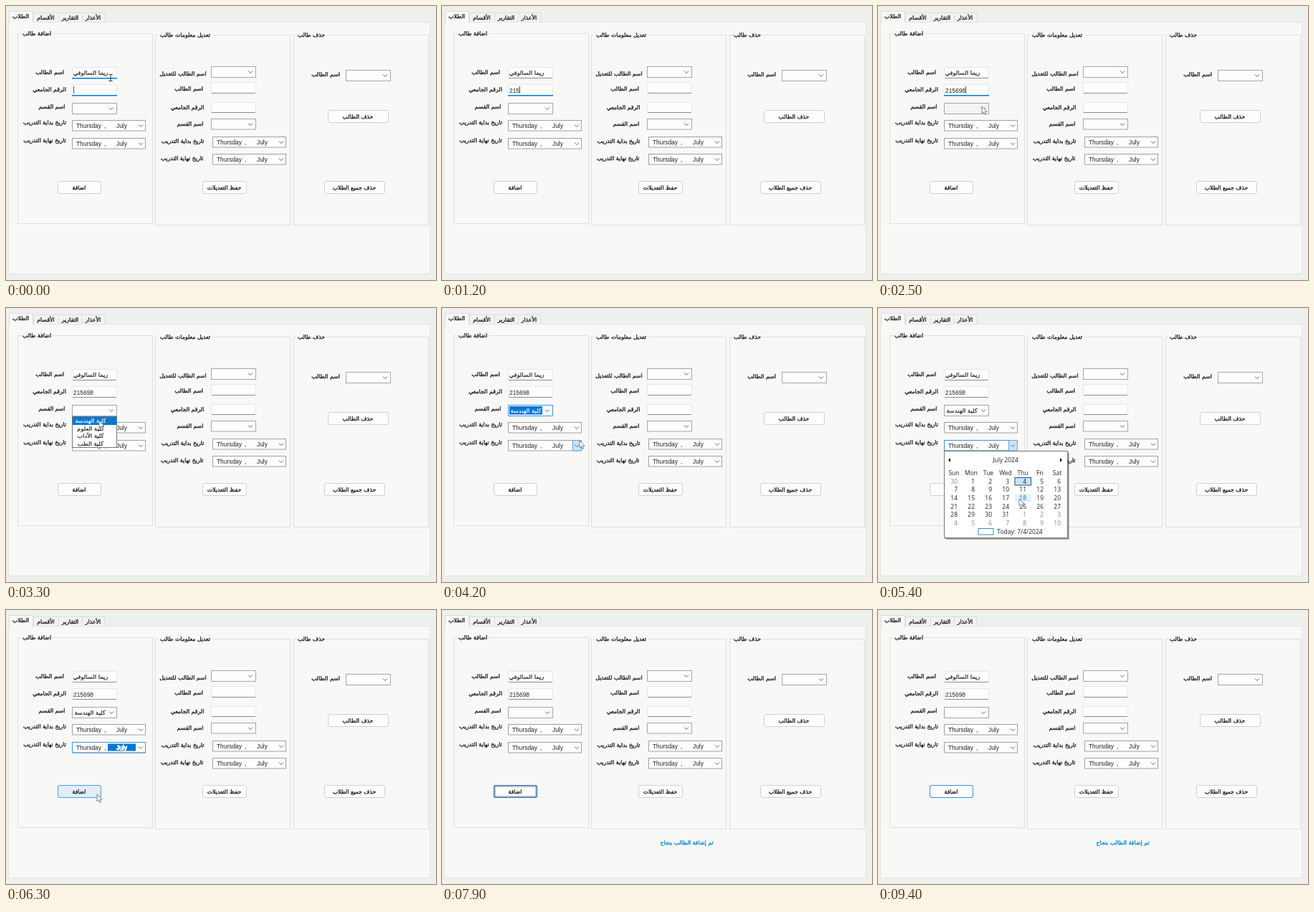
Write an HTML page that moves like this. It is 600 by 382 pixels and loops after 9.5 s.

```html
<!DOCTYPE html>
<html lang="ar">
<head>
<meta charset="utf-8">
<title>إضافة طالب</title>
<style>
html, body { margin: 0; width: 100%; height: 100%; overflow: hidden; background: #eef0ee; }
svg { display: block; width: 600px; height: 382px; }
text { font: 8.4px "Liberation Sans", sans-serif; fill: #222; }
.ar { font: 7.8px "DejaVu Sans", sans-serif; text-anchor: middle; stroke: #222; stroke-width: .35; }
.val { font-size: 8.3px; stroke-width: .2; }
.cal text { font: 8.5px "Open Sans", sans-serif; text-anchor: middle; }
.cal .day { text-anchor: end; }
.cal .out { fill: #858585; }
.note { fill: #0a84d8; stroke: #0a84d8; }
.light, #row + text { fill: #fff; stroke: #fff; }
.chev { fill: none; stroke: #666; }
.group { fill: none; stroke: #dedfde; }
</style>
</head>
<body>
<svg id="stage" viewBox="0 0 600 382"></svg>
<script>
const BLUE = '#0078d4', PAGE = '#f8f9f7';
const LOOP = 9500, STEP = 100;

const rect = (x, y, w, h, fill, stroke = 'none', more = '') =>
  `<rect x="${x}" y="${y}" width="${w}" height="${h}" fill="${fill}" stroke="${stroke}" ${more}/>`;
const text = (s, x, y, cls = '', more = '') => `<text x="${x}" y="${y}" class="${cls}" ${more}>${s}</text>`;
const arabic = (s, x, y, cls = '', more = '') => text(s, x, y + 2.5, 'ar ' + cls, more);
const part = (id, body) => `<g id="${id}">${body}</g>`;

const chevron = (x, y) => `<path class="chev" d="M${x - 3} ${y - 1.5}l3 3 3-3"/>`;

const group = (title, x, y, w, h, cx, tw) =>
  rect(x + .5, y + .5, w, h, 'none', '', 'class="group"') +
  rect(cx - tw / 2, y - 3, tw, 7, PAGE) + arabic(title, cx, y);

const field = (x, y, w = 62, h = 15) =>
  rect(x + .5, y + .5, w, h, '#fdfdfd', '#e6e6e6', 'rx="1.5"') +
  rect(x + 1, y + h, w - 1, 1, '#8c8c8c');

const combo = (x, y, h = 15) =>
  rect(x + .5, y + .5, 62, h, '#fdfdfd', '#a6a6a6') + chevron(x + 55, y + 8);

const date = (x, y) =>
  rect(x + .5, y + .5, 102, 14.5, '#fdfdfd', '#a0a0a0') +
  text('Thursday', x + 6, y + 10.5) + text(',', x + 45, y + 10.5) +
  text('July', x + 62, y + 10.5) + chevron(x + 96, y + 8);

const button = (s, x, y, w) =>
  rect(x + .5, y + .5, w, 17, '#fdfdfd', '#cfcfcf', 'rx="2.5"') + arabic(s, x + w / 2, y + 9);

function tabs() {
  const tab = (s, x, w) => rect(x + .5, 9.5, w, 13, '#f1f2f1', '#dcdddc') + arabic(s, x + w / 2, 16);
  return tab('الأقسام', 38, 35) + tab('التقارير', 73, 33) + tab('الأعذار', 106, 31) +
    rect(3.5, 22.5, 588, 351, PAGE, '#e2e3e2') +
    rect(4.5, 7.5, 33, 16, PAGE, '#dcdddc') + rect(5, 21, 32, 4, PAGE) + arabic('الطلاب', 20.5, 14.5);
}

function calendar() {
  let out = rect(95, 202, 172, 121, '#000', 'none', 'opacity=".22"') +
    rect(94, 201, 172, 121, '#000', 'none', 'opacity=".25"') +
    rect(92.5, 199.5, 172, 121, '#fff', '#777') +
    '<path d="M101 209l-3 3 3 3zM254 209l3 3-3 3z" fill="#111"/>' +
    text('July 2024', 178, 215) +
    rect(191, 259, 23, 11.5, '#e5f1fb', 'none', 'id="hover"') +
    rect(191, 236.5, 22.5, 10.5, '#cbe3f6', '#17568c');
  'Sun Mon Tue Wed Thu Fri Sat'.split(' ').forEach((d, i) => out += text(d, 106 + 24 * i, 233));
  for (let i = 0; i < 42; i++) {
    const n = i < 1 ? 30 : (i - 1) % 31 + 1;
    const x = 111 + 24 * (i % 7), y = 244.5 + 11.7 * Math.floor(i / 7);
    out += text(n, x, y, 'day' + (i < 1 || i > 31 ? ' out' : ''), i === 18 ? 'id="pick"' : '');
  }
  return out + rect(140, 307.5, 21, 8.5, '#fff', '#3c8ac8') + text('Today: 7/4/2024', 198, 315);
}

function list() {
  const names = ['كلية الهندسة', 'كلية العلوم', 'كلية الآداب', 'كلية الطب'];
  return rect(92.5, 151.5, 62, 43, '#fff', '#777') +
    rect(93, 152, 61, 11, BLUE, 'none', 'id="row"') +
    names.map((s, i) => arabic(s, 118, 157.5 + 10.5 * i, 'val')).join('');
}

const stage = document.getElementById('stage');
stage.innerHTML =
  rect(0, 0, 600, 382, '#eef0ee') + tabs() +
  group('اضافة طالب', 16, 38, 188, 265, 43, 44) +
  group('تعديل معلومات طالب', 208, 40, 188, 265, 250, 76) +
  group('حذف طالب', 401, 40, 188, 265, 426, 40) +

  arabic('اسم الطالب', 61, 92) + arabic('الرقم الجامعي', 60.5, 116.5) + arabic('اسم القسم', 64, 140) +
  arabic('تاريخ بداية التدريب', 54, 162) + arabic('تاريخ نهاية التدريب', 54, 187) +
  field(92, 85) + part('nameFocus', rect(92, 100, 63, 1.5, BLUE)) + arabic('ريما السالوفي', 118, 93.5, 'val') +
  field(92, 109) + part('numFocus', rect(92, 124, 63, 1.5, BLUE)) +
  text('', 94, 120.5, '', 'id="num"') + rect(94, 112, .8, 10, '#222', 'none', 'id="caret"') +
  combo(92, 135) + part('comboHot', rect(93, 136, 61, 14, '#f3f4f5') + chevron(147, 143)) +
  part('comboSel', rect(92.5, 135.5, 62, 15, 'none', '#3a94dc') + rect(94, 137, 46, 11.5, BLUE)) +
  arabic('كلية الهندسة', 117, 143, 'val', 'id="dept"') +
  date(92, 159) + date(92, 184) +
  part('dateFocus', rect(92.5, 184.5, 102, 14.5, 'none', '#3a94dc')) +
  part('dateHot', rect(182.5, 184.5, 12, 14.5, '#cce4f7', '#5ba5dd') + chevron(188, 192)) +
  part('monthSel', rect(142, 186.5, 39, 10, BLUE) + text('July', 154, 194.5, 'light', 'stroke="none"')) +
  button('اضافة', 72, 244, 60) +
  part('addHot', rect(72.5, 244.5, 60, 17, '#e0eef9', '#4c9ed9', 'rx="2.5"') + arabic('اضافة', 102, 253)) +
  part('addFocus', rect(72.5, 244.5, 60, 17, 'none', '#3a8fd2', 'rx="2.5"')) +
  part('addRing', rect(72.5, 244.5, 60, 17, 'none', '#2671ad', 'rx="2"') +
    rect(74, 246, 57, 14, 'none', '#557', 'stroke-width=".8"')) +

  arabic('اسم الطالب للتعديل', 247, 94) + arabic('اسم الطالب', 255, 115) + arabic('الرقم الجامعي', 253, 141) +
  arabic('اسم القسم', 257, 164.5) + arabic('تاريخ بداية التدريب', 246.5, 188.5) +
  arabic('تاريخ نهاية التدريب', 245.5, 212.5) +
  combo(286, 84) + field(286, 106) + field(286, 134, 62, 14) + combo(286, 157, 14.5) +
  date(288, 182) + date(288, 206) + button('حفظ التعديلات', 274, 244, 61) +

  arabic('اسم الطالب', 446, 95) + combo(474, 89) +
  button('حذف الطالب', 449, 145, 84) + button('حذف جميع الطلاب', 444, 244, 84) +

  part('list', list()) + `<g id="cal" class="cal">${calendar()}</g>` +
  arabic('تم إضافة الطالب بنجاح', 341.5, 324.5, 'note', 'id="note"') +
  part('beam', '<path d="M143.5 95.5h2l.5.5.5-.5h2M146 96v8M143.5 104.5h2l.5-.5.5.5h2" fill="none" stroke="#222"/>') +
  part('arrow', '<path d="M0 0V10L2.4 7.8 4 11.5 5.7 10.8 4.1 7.2H7.2Z" fill="#fff" stroke="#666" stroke-width=".8"/>');

const el = id => document.getElementById(id);
const show = (id, on) => el(id).style.display = on ? '' : 'none';

// time, x, y of the pointer tip
const path = [
  [1800, 146, 117], [2200, 145, 140], [2800, 145, 140], [3200, 130, 157], [3500, 130, 157],
  [3800, 175, 195], [4100, 192, 185], [4700, 192, 185], [5100, 205, 240], [5400, 197, 266],
  [5700, 197, 266], [6200, 127, 257], [6800, 127, 257], [7100, 132, 277], [7300, 132, 277]
];

function pointer(t) {
  const i = path.findIndex(p => p[0] > t);
  if (i < 0) return path[path.length - 1].slice(1);
  if (i === 0) return path[0].slice(1);
  const [a, x0, y0] = path[i - 1], [b, x1, y1] = path[i];
  const u = (t - a) / (b - a), k = u * u * (3 - 2 * u);
  return [x0 + (x1 - x0) * k, y0 + (y1 - y0) * k];
}

function draw(t) {
  const within = (a, b) => t >= a && t < b;
  const typed = [900, 1100, 1200, 1400, 1500, 1700].filter(k => t >= k).length;

  show('nameFocus', t < 100);
  show('numFocus', t < 2800);
  el('num').textContent = '215698'.slice(0, typed);
  el('caret').setAttribute('x', 94 + typed * 4.67);
  show('caret', t < 2800 && (within(900, 1800) || t % 1000 < 600));

  show('comboHot', within(2200, 2800));
  show('list', within(2800, 3500));
  show('comboSel', within(3500, 4700));
  show('dept', within(3500, 7100));
  el('dept').classList.toggle('light', t < 4700);

  show('dateFocus', within(4700, 6800));
  show('dateHot', within(4100, 5700));
  show('cal', within(4700, 5700));
  const over = within(5300, 5700);
  show('hover', over);
  el('pick').style.fill = over ? BLUE : '';
  show('monthSel', within(5700, 6800));

  show('addHot', within(6100, 7100));
  show('addFocus', t >= 7100);
  show('addRing', within(7100, 8700));
  el('addRing').style.opacity = Math.min(1, (8700 - t) / 700);
  show('note', t >= 7200);

  show('beam', t < 900);
  show('arrow', within(1800, 7400));
  el('arrow').setAttribute('transform', `translate(${pointer(t)})`);
}

const start = performance.now();
function tick(now) {
  const t = Math.max(0, now - start) % LOOP;
  draw(Math.floor(t / STEP) * STEP);
  requestAnimationFrame(tick);
}
draw(0);
requestAnimationFrame(tick);
</script>
</body>
</html>
```
